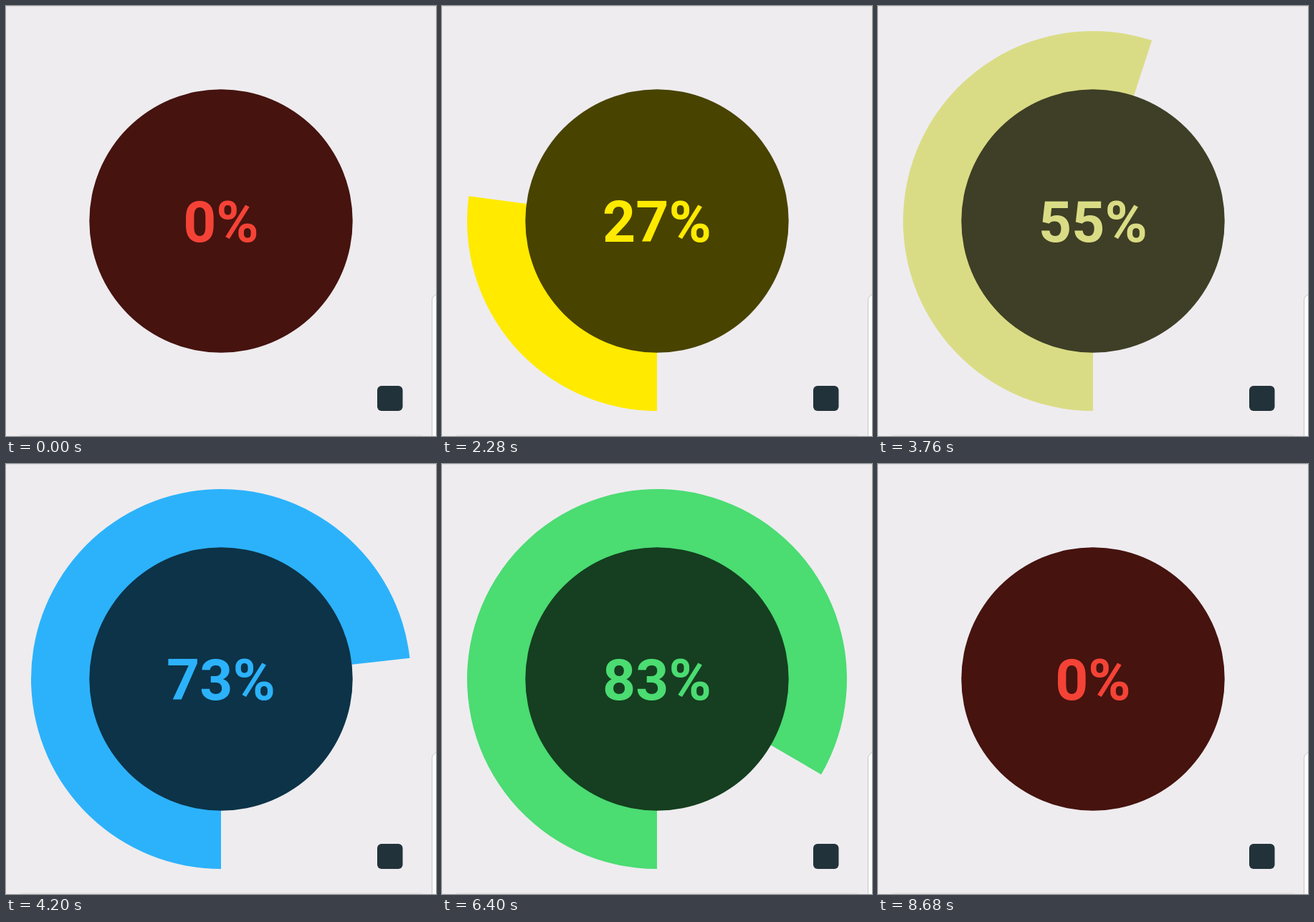
These frames come from a looping animation (600x600 px, 8720 ms). An HTML page:

```html
<!DOCTYPE html>
<html lang="en">
<head>
<meta charset="utf-8">
<title>Radial progress</title>
<style>
  html, body { margin: 0; width: 100%; height: 100%; overflow: hidden; background: #eeecef; }
  svg { display: block; width: 100%; height: 100%; }
  text { font: 700 80.5px Roboto, sans-serif; text-anchor: middle; }
</style>
</head>
<body>
<svg viewBox="0 0 600 600">
  <rect width="600" height="1" fill="#dfdde0"/>
  <rect x="14" y="598" width="572" height="20" rx="10" fill="#e4e3e4"/>
  <rect x="594.5" y="402.5" width="40" height="240" rx="8" fill="#fdfdfd" stroke="#c6c5c7"/>
  <path id="arc"/>
  <circle id="disc" cx="300" cy="300" r="183.7"/>
  <text id="label" x="300" y="329"></text>
  <rect x="518" y="530" width="35.5" height="35" rx="6" fill="#22323a"/>
</svg>
<script>
const LOOP = 8720, DURATION = 860, CENTER = 300, RADIUS = 265, SHADE = 0.285;
const RED = [244, 67, 54], YELLOW = [255, 234, 0], BLUE = [0, 176, 255], GREEN = [0, 230, 118];

// Each step eases from the previous value and colour, starting at the given time.
const steps = [
  { at: 730, value: 27, color: YELLOW },
  { at: 2240, value: 48, color: YELLOW },
  { at: 3445, value: 74, color: BLUE },
  { at: 4693, value: 90, color: GREEN },
  { at: 6214, value: 20, color: RED },
  { at: 7835, value: 0, color: RED }
];

const [arc, disc, label] = ['arc', 'disc', 'label'].map(id => document.getElementById(id));

const clamp = x => Math.min(1, Math.max(0, x));
const ease = x => x < 0.5 ? 2 * x * x : 1 - 2 * (1 - x) ** 2;
const mix = (a, b, p) => a + (b - a) * p;
// Blend squared channels so mid-tones stay bright.
const mixColor = (a, b, p) => a.map((c, i) => Math.sqrt(mix(c * c, b[i] * b[i], p)));
const rgb = (color, k = 1) => `rgb(${color.map(c => Math.round(c * k)).join()})`;

function stateAt(t) {
  let value = 0, color = RED;
  for (const s of steps) {
    const p = ease(clamp((t - s.at) / DURATION));
    value = mix(value, s.value, p);
    color = mixColor(color, s.color, p);
  }
  return { value, color };
}

// Pie slice that grows clockwise from the bottom.
function slice(percent) {
  if (percent < 0.05) return '';
  const a = percent / 100 * 2 * Math.PI;
  const x = CENTER - RADIUS * Math.sin(a);
  const y = CENTER + RADIUS * Math.cos(a);
  return `M${CENTER} ${CENTER}v${RADIUS}A${RADIUS} ${RADIUS} 0 ${+(percent > 50)} 1 ${x} ${y}Z`;
}

function draw(t) {
  const { value, color } = stateAt(t);
  arc.setAttribute('d', slice(value));
  arc.setAttribute('fill', rgb(color));
  disc.setAttribute('fill', rgb(color, SHADE));
  label.setAttribute('fill', rgb(color));
  label.textContent = Math.round(value) + '%';
}

function tick() {
  draw(performance.now() % LOOP);
  requestAnimationFrame(tick);
}
tick();
</script>
</body>
</html>
```
